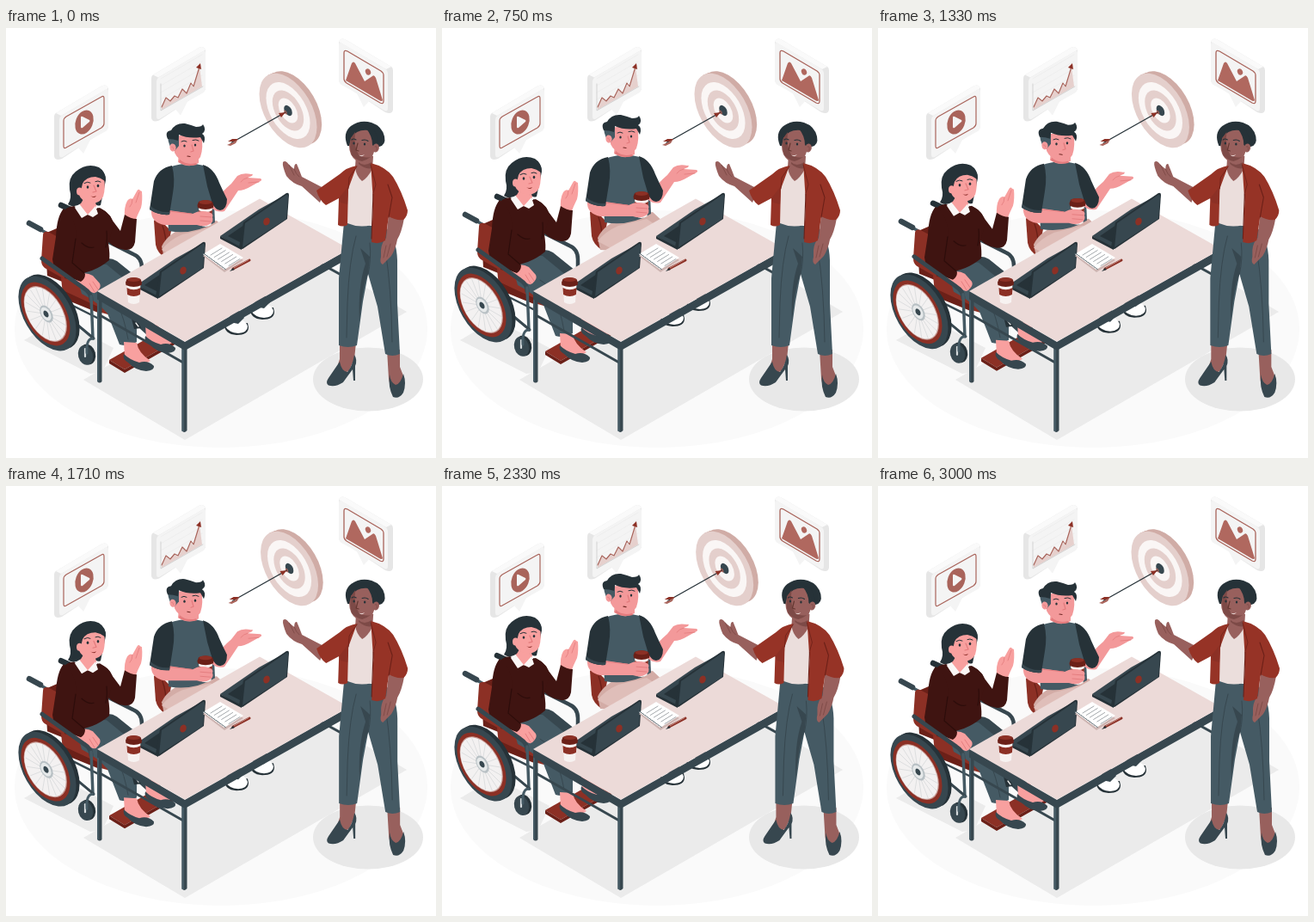
These frames come from a looping animation (500 by 500 pixels, 3040 ms). An HTML page with a canvas:

```html
<!DOCTYPE html>
<html lang="en">
<head>
<meta charset="utf-8">
<title>Team meeting</title>
<style>
html, body { margin: 0; width: 100%; height: 100%; overflow: hidden; background: #fff; }
canvas { display: block; width: 500px; height: 500px; }
</style>
</head>
<body>
<canvas id="stage" width="500" height="500"></canvas>
<script>
const ctx = document.getElementById('stage').getContext('2d');
const LOOP = 3040, STEP = 125 / 3;

const RED = '#8c3025', DEEP = '#6b2018', ROSE = '#a9645b', PALE = '#ecdad8', PINK = '#e4cfcc';
const JACKET = '#963326', MAROON = '#3f1411', WINE = '#2d0d0b';
const INK = '#263238', SLATE = '#37474f', STEEL = '#455a64';
const SKIN = '#f3999a', ROSY = '#f8a09f', BLUSH = '#e37b7d', BROWN = '#98605d', UMBER = '#7d4a47';
const WHITE = '#fff';

ctx.lineCap = ctx.lineJoin = 'round';

function fill(color, d) {
  ctx.fillStyle = color;
  ctx.fill(new Path2D(d));
}
function line(color, width, d) {
  ctx.strokeStyle = color;
  ctx.lineWidth = width;
  ctx.stroke(new Path2D(d));
}
function oval(color, x, y, rx, ry = rx, turn = 0) {
  ctx.fillStyle = color;
  ctx.beginPath();
  ctx.ellipse(x, y, rx, ry, turn, 0, 7);
  ctx.fill();
}
function at(x, y, draw) {
  ctx.save();
  ctx.translate(x, y);
  draw();
  ctx.restore();
}
// circle lying on the wall that faces lower left
function disc(color, x, y, r) {
  ctx.save();
  ctx.transform(.866, .5, 0, 1, x, y);
  oval(color, 0, 0, r);
  ctx.restore();
}

// ---- motion ----
const SHAKE = [0, -1, 2, -4, 4, -4, 4, -4, 2, -1, 0];
function shake(t, period) {
  const k = t % period / period * 10, i = Math.floor(k);
  return SHAKE[i] + (SHAKE[(i + 1) % 11] - SHAKE[i]) * (k - i);
}
const float = t => -10 * (1 - Math.abs(1 - t % 1500 / 750));

// ---- scenery ----
function floor() {
  oval('#fafafa', 250, 350, 240, 138);
  fill('#ebebeb', 'M90 409L208 479L466 330L348 260Z');
  fill('#ebebeb', 'M21 363L62 339L125 372L112 400L98 402Z');
  oval('#e8e8e8', 421, 408.5, 64, 37);
}

function bubble() {
  fill('#e6e6e6', 'M58 99L112 67Q117 65 119 70L119 116L65 152Q57 155 56 149L56 104Q56 100 58 99Z');
  fill('#fafafa', 'M58 99L112 67Q117 65 119 70L64 102Z');
  fill('#f4f4f4', 'M62 107Q62 103 66 101L115 72Q119 69 119 74L119 114Q119 118 116 120L98 130L90 146L84 139L66 150Q62 152 62 147Z');
}
function panels() {
  bubble();
  line(ROSE, 1.2, 'M67 108Q67 105 70 103L111 80Q114 78 114 82L114 111Q114 114 111 116L70 139Q67 141 67 137Z');
  oval(ROSE, 91, 109.5, 10, 14.5, .38);
  fill('#f4f4f4', 'M87 104Q87 102 89 103L97 107Q98 108 97 109L89 116Q87 117 87 115Z');

  at(113, -44.5, bubble);
  for (let i = 0; i < 5; i++) line('#e9e9e9', .6, `M180 ${91 - i * 8}L228 ${63 - i * 8}`);
  fill('#e6d0cd', 'M181 93L186 82L191 86L196 80L200 82L205 72L210 77L215 66L218 70L225 45L228 68L181 95Z');
  line(ROSE, 1.2, 'M181 92L186 81L191 85L196 79L200 81L205 71L210 76L215 64L218 68L225 45');
  fill(RED, 'M226 41L221 46L227 48Z');
  line('#c4c4c4', .7, 'M180 65L180 96L229 68');

  ctx.save();
  ctx.transform(-1, 0, 0, 1, 506, -54);
  bubble();
  ctx.restore();
  line(ROSE, 1.3, 'M393 29Q393 25 397 27L436 50Q439 52 439 55L439 85Q439 89 435 87L396 64Q393 62 393 59Z');
  fill('#b0685f', 'M395 61L402 41Q404 38 406 41L417 62L426 56Q428 54 430 58L438 84Q437 86 434 84Z');
  oval('#b0685f', 421, 51, 3, 3.8, -.4);
}

function target() {
  disc('#d0aca6', 334, 93, 38.3);
  fill('#d0aca6', 'M304 55L311 52L357 133L351 136Z');
  [[38.7, PINK], [29.5, '#faf6f5'], [21, PINK], [13, '#faf6f5'], [5.5, SLATE]]
    .forEach(([r, c]) => disc(c, 328, 96, r));
  disc(ROSE, 325, 98, 2);
  line(INK, 1.3, 'M262 133.5L325 98');
  fill(RED, 'M325 98L317 99L320 104Z');
  fill(RED, 'M258 132L263 129L270 129L266 132Z');
  fill(ROSE, 'M257 136L266 132L270 129L267 134L261 137Z');
}

// ---- man behind the table ----
function manShoe(x, y) {
  fill(INK, `M${x - 14} ${y - 4}Q${x - 14} ${y + 7} ${x} ${y + 8}Q${x + 14} ${y + 8} ${x + 14} ${y - 1}L${x + 13} ${y - 6}Z`);
  fill(WHITE, `M${x - 13} ${y - 8}L${x - 13} ${y - 2}Q${x - 9} ${y + 5} ${x + 2} ${y + 6}Q${x + 13} ${y + 5} ${x + 13} ${y - 2}Q${x + 12} ${y - 8} ${x} ${y - 13}Z`);
  fill(SLATE, `M${x - 12} ${y - 8}L${x + 2} ${y - 5}L${x + 9} ${y - 12}L${x} ${y - 24}Z`);
}
function coffee(x, y) {
  fill('#f7f2f1', `M${x - 8} ${y + 6}L${x + 8} ${y + 6}L${x + 6.5} ${y + 27}Q${x} ${y + 31} ${x - 6.5} ${y + 27}Z`);
  fill(RED, `M${x - 8} ${y + 10}Q${x} ${y + 14.5} ${x + 8} ${y + 10}L${x + 7.4} ${y + 18}Q${x} ${y + 22} ${x - 7.4} ${y + 18}Z`);
  fill(DEEP, `M${x - 9.5} ${y + 4}L${x - 8} ${y}Q${x} ${y - 3.5} ${x + 8} ${y}L${x + 9.5} ${y + 4}L${x + 9} ${y + 7}Q${x} ${y + 11} ${x - 9} ${y + 7}Z`);
  oval(RED, x, y + .6, 7.5, 2.5);
}
function man() {
  manShoe(268, 349);
  manShoe(298, 331);
  fill(RED, 'M172 224Q174 221 182 226L192 236L186 268Q176 262 174 252Z');
  line(DEEP, 1.4, 'M182 230Q186 240 187 262');
  fill('#d3aca6', 'M181 254Q188 238 214 229L245 224L262 240L215 270L184 268Z');
  fill('#dfbeb9', 'M181 258Q189 247 205 240L238 232L250 240L200 268Z');
  // torso and neck
  fill(STEEL, 'M190 162Q210 154 230 160Q238 166 241 180L243 226Q218 241 189 236L187 200Z');
  fill(SKIN, 'M201 146L224 148L224 157Q213 164 200 156Z');
  fill(BLUSH, 'M202 153Q210 160 221 157L222 159Q210 162 201 156Z');
  // far arm
  fill(SKIN, 'M240 206Q251 190 262 181L269 172Q275 168 285 170Q288 169 286 172L281 174L296 175Q299 177 294 179L285 184Q277 189 270 189L254 213Q246 215 240 210Z');
  line(BLUSH, .8, 'M281 174Q276 175 273 179M294 179L282 180');
  fill(INK, 'M229 159Q242 163 248 180Q253 191 257 199Q257 211 249 212Q243 211 240 204L234 184Z');
  // near arm with the cup
  coffee(232, 202);
  fill(SKIN, 'M169 207L190 212L217 216Q225 211 236 214Q242 216 240 220Q242 225 237 228Q231 232 222 229L184 229Q170 226 169 215Z');
  line(BLUSH, .9, 'M226 219L239 220M226 224L238 225M189 213L216 216');
  fill(INK, 'M193 160Q177 163 172 178L167 211Q177 218 190 217L194 192Q197 175 193 160Z');
  fill(SLATE, 'M167 211Q177 218 190 217L190.500 214Q177 215 168 207Z');
  // head
  fill(SKIN, 'M196 126L227 122Q230 139 226 150Q221 158 211 156Q200 154 196 145Z');
  fill(STEEL, 'M188 126L201 124L201 137L196 143Q189 139 188 126Z');
  oval(SKIN, 194, 139, 3.6, 4.6, -.2);
  line(BLUSH, .8, 'M192.500 138Q194 137 195 141');
  fill(INK, 'M188 129Q184 120 192 119Q197 110 208 111Q216 113 221 115Q228 115 229 112Q234 119 228 123Q233 126 230 134L226 127Q212 129 201 124L200 131Q195 129 188 129Z');
  oval(INK, 207.5, 137, 1.2, 1.6);
  oval(INK, 220, 136, 1.2, 1.6);
  line(INK, 1, 'M204 132Q207 130 210 132M217 130.500Q221 129 224 131');
  line(BLUSH, 1.2, 'M216 136L218 143L215 144');
  line('#702824', 1.2, 'M211 149L214 149.500');
}

// ---- woman in the wheelchair ----
function wheel() {
  disc(INK, 52, 330, 38.8);
  disc(SLATE, 48, 332, 38.8);
  disc(RED, 46, 332.5, 33);
  disc('#c59a94', 45.8, 332.5, 29);
  disc('#f3f1f1', 45.5, 332.5, 28);
  ctx.save();
  ctx.transform(.866, .5, 0, 1, 46.5, 332.5);
  for (let i = 0; i < 18; i++) {
    const a = i * Math.PI / 9;
    line('#c9cccd', .5, `M0 0L${27 * Math.cos(a)} ${27 * Math.sin(a)}`);
  }
  ctx.restore();
  disc('#b8c0c4', 47, 332.5, 9);
  disc('#e6e9ea', 46.5, 332.5, 7);
  disc(SLATE, 46.5, 332.5, 3.5);
}
function chairBack() {
  line(STEEL, 4, 'M64 206L82 216');
  line(INK, 6.5, 'M64 206L75 211');
  line(STEEL, 3.5, 'M27 227L50 240');
  line(SLATE, 6.5, 'M27 227L40 234');
  fill(DEEP, 'M45 239L66 230L78 300L48 288Z');
  fill(RED, 'M43 241Q43 236 49 237L66 246L68 292L45 279Q41 276 41 270Z');
  line(SLATE, 4.5, 'M118 248L148 263Q158 267 158 279L158 292');
}
function foot(x, y) {
  fill(ROSY, `M${x - 13} ${y - 23}L${x + 2} ${y - 22}Q${x + 4} ${y - 10} ${x + 18} ${y - 1}L${x + 8} ${y + 5}L${x - 12} ${y - 5}Z`);
  fill(SLATE, `M${x - 13} ${y - 9}Q${x - 6} ${y - 2} ${x + 5} ${y + 1}Q${x + 15} ${y - 2} ${x + 22} ${y + 5}Q${x + 23} ${y + 10} ${x + 13} ${y + 11}Q${x} ${y + 10} ${x - 8} ${y + 1}Q${x - 15} ${y - 3} ${x - 13} ${y - 9}Z`);
}
function seated() {
  chairBack();
  fill(RED, 'M64 290L112 302L150 318L122 334L104 329L66 310Z');
  fill(DEEP, 'M66 305L107 324L107 331L70 316Z');
  // foot rest
  fill(RED, 'M120 386L180 352L198 363L138 397Z');
  fill(DEEP, 'M120 386L138 397L138 401L120 390ZM138 397L198 363L198 367L138 401Z');
  // legs
  fill(SLATE, 'M98 279Q115 262 129 271L165 300L168 340L180 351L165 358L143 338Z');
  foot(175, 367);
  fill(STEEL, 'M82 288Q98 273 117 275L150 302L152 337L152 365Q142 371 132 368L118 332Q106 318 88 309Z');
  line(SLATE, 1, 'M114 303Q133 313 142 362');
  fill(INK, 'M146 338L153 340L157 349L149 350Z');
  line('#eee', 1.3, 'M151 343L154 347');
  foot(150, 388);
  // far arm and hand
  fill(ROSY, 'M138 221Q137 208 141 201Q144 197 147 199L152 190Q154 186 156 189L158 190Q159 201 157 209Q153 217 150 225Z');
  line(BLUSH, .8, 'M147 199Q147 205 144 208M155 191L151 203');
  fill(MAROON, 'M106 209Q119 212 124 224L133 236L138 217Q145 222 152 222L150 249Q148 259 138 258Q123 256 113 242Z');
  // body
  fill(MAROON, 'M79 207Q93 215 109 209Q123 216 125 229L119 250Q121 263 120 270Q102 285 80 286L62 276Q58 237 66 214Q70 208 79 207Z');
  line(WINE, 1.2, 'M117 236Q118 247 116 255M88 250Q96 257 102 255');
  fill(ROSY, 'M86 198L106 200L104 212Q95 224 84 209Z');
  fill('#faf7f6', 'M84 203L95 217L88 221L80 209ZM95 217L104 207L107 216L101 220Z');
  // near arm
  fill(ROSY, 'M82 287Q93 283 101 288L109 297Q111 301 107 305Q104 310 99 307L90 300L81 295Z');
  line(BLUSH, .9, 'M101 295L107 304M97 297L103 307');
  fill(MAROON, 'M67 210Q59 219 58 243L54 269Q55 281 65 287L87 295Q92 292 92 286L77 273L82 240Q79 217 67 210Z');
  line(WINE, 1.2, 'M77 273L81 245M77 273L91 285');
  // head
  fill(INK, 'M81 167Q94 156 108 162Q116 167 116 177L110 206Q104 208 104 202L98 186L87 204Q79 210 72 205Q77 198 74 188Q72 174 81 167Z');
  fill(ROSY, 'M87 177Q98 168 114 175Q116 186 113 196Q109 204 99 204Q88 203 84 192Z');
  fill(INK, 'M83 192L78 182Q80 167 93 163Q107 159 114 169Q117 174 115 178Q110 174 104 173Q93 173 89 181Q88 187 86 190Z');
  oval(ROSY, 85.5, 190, 3.5, 4.5);
  oval(INK, 95, 185, 1.3, 1.7);
  oval(INK, 107, 183.5, 1.3, 1.7);
  line(INK, 1, 'M91 180.500Q95 178 98 180M104 178.500Q107 177 110 179');
  line(BLUSH, 1.2, 'M102 183L105 190L101 191');
  fill('#8d2e2a', 'M98 195Q101 197 105 195Q103 199 98 195Z');
  // chair frame
  line(SLATE, 2.5, 'M70 319L110 339');
  line(SLATE, 5, 'M42 268L91 303Q99 308 99 316');
  line(STEEL, 3.5, 'M99 312L101 361');
  line(SLATE, 3, 'M78 341L102 361');
  wheel();
  oval(INK, 95, 379.5, 9, 12, -.25);
  oval(SLATE, 92.5, 380.5, 8.5, 11.5, -.25);
  line('#d5dadc', 2.2, 'M92 373L92 382');
  line(STEEL, 3, 'M101 361Q93 361 94 378');
}

// ---- table and things on it ----
function laptop() {
  fill(SLATE, 'M152 299L197 268L226 252L215 288L177 314Z');
  fill(INK, 'M161 299L196 275L206 287L177 307Z');
  fill(INK, 'M152 299L177 312L177 315L152 302Z');
  fill(INK, 'M179 283L229 249Q232 248 232 251L230 279L178 314L174 312Z');
  fill(SLATE, 'M181 284L229 251Q231 250 231 253L229 279L178 312Z');
  oval(RED, 206, 282, 3.6, 4.6, .4);
}
function table() {
  line(SLATE, 3, 'M111 335L206 389M366 274L395 290');
  fill(SLATE, 'M106 310h5.5V411Q109 414 106 411Z');
  fill(STEEL, 'M106 312h2V411h-2Z');
  fill(SLATE, 'M204.5 366h6V468Q207 472 204.5 468Z');
  fill(STEEL, 'M204.5 368h2.5V469h-2.5Z');
  fill(SLATE, 'M394 262h5V366h-5Z');
  fill(SLATE, 'M106 306L208 365L399 257V267.5L208 375L106 315.500Z');
  fill(PALE, 'M106 306L295 198.5L399 257L208 364.5Z');

  at(97, -57, laptop);
  laptop();
  // notebook
  fill('#cdb5b2', 'M229 265L249 254L276 270L254 284Z');
  fill(WHITE, 'M229 263L249 251L276 267L254 281Z');
  for (let i = 0; i < 6; i++) {
    const x = 238 + i * 4.2, y = 264 + i * 2.5;
    line('#8f9498', .8, `M${x} ${y}L${x + 13} ${y - 8}`);
  }
  for (let i = 0; i < 9; i++) line(SLATE, .9, `M${230 + i * 2.9} ${262 + i * 2.1}l2 2`);
  line(RED, 3, 'M264 280L283 270');
  line('#c38b83', 1, 'M265 279L282 269.5');
  fill(INK, 'M260 283L264 279L266 281Z');
  coffee(148.5, 292);
}

// ---- presenter ----
function presenter() {
  // ankles and shoes
  fill(BROWN, 'M388 365L407 366L405 385L399 398L383 409Q385 393 388 385Z');
  fill(SLATE, 'M388 388Q390 399 397 400Q403 393 405 380Q409 386 406 393L406 410L404 410L403 397Q397 405 392 412Q383 418 375 415.500Q371 413 375 407Z');
  fill(BROWN, 'M443 374L458 374L458 394L463 407L459 423L448 422L445 408Z');
  fill(SLATE, 'M446 403Q447 412 453 415Q459 414 462 402Q466 413 462 424Q457 432 450 429Q444 417 446 403Z');
  // trousers
  fill(STEEL, 'M393 226L441 232Q454 243 455 270L455 320L458 379Q449 383 441 379L432 324L421 286L415 318L408 369Q398 373 387 369L387 291Z');
  line(SLATE, 1, 'M423 250Q425 269 421 286M407 242Q399 270 397 320L396 360M441 258Q448 300 449 365');
  fill(SLATE, 'M412 256Q420 263 423 266L421 286Q414 302 411 342Q409 300 418 274Z');
  // left arm
  fill(BROWN, 'M365 203L344 184Q333 181 326 172Q321 160 322 156Q325 153 329 159L335 164Q335 157 338 158Q341 165 344 173L371 187Z');
  line(UMBER, .9, 'M329 159L335 171M335 164Q337 170 341 173');
  // shirt and jacket
  fill('#ebdedc', 'M398 164L424 160L427 193L425 229Q411 233 397 227Z');
  fill(BROWN, 'M407 147L427 149L426 164Q420 175 414 178Q407 172 406 162Z');
  fill(UMBER, 'M410 156Q416 162 425 156L426 163Q418 165 410 158Z');
  fill(JACKET, 'M408 160Q396 162 388 170L361 189Q364 200 372 206L387 198L386 229Q391 232 397 229L398 187Z');
  fill(RED, 'M387 198L398 184L397 205L389 203Z');
  // right hand
  fill(BROWN, 'M445 217L463 221Q460 238 455 246Q453 257 448 265L438 275Q434 273 436 266L436 258Q437 249 442 244Z');
  line(UMBER, .9, 'M447 251L443 266M442 253L439 267');
  fill(JACKET, 'M424 157Q441 161 450 173Q460 189 467 212Q467 219 462 223Q453 224 445 219L441 247Q434 252 425 249L427 202Z');
  line(DEEP, 1.1, 'M445 220L449 197L444 182M427 193L425 245');
  line(DEEP, .8, 'M424 159L430 182L427 192M408 161L399 174L398 187');
  // head
  fill(INK, 'M397 137Q391 122 401 114Q412 106 425 110Q437 114 440 126Q442 136 434 138L426 140Z');
  fill(BROWN, 'M401 128Q408 117 422 119L429 134Q429 146 424 152Q416 158 407 154Q399 148 399 137Z');
  fill(UMBER, 'M401 128Q399 139 402 148Q408 154 414 155Q420 153 424 150Q416 152 410 147Q404 138 406 121Z');
  fill(INK, 'M418 116L428 118L433 130L431 141L426 136Q426 125 418 116Z');
  oval(BROWN, 430, 139.5, 3.8, 5, .2);
  line(UMBER, .8, 'M429 138Q432 136 431 142');
  oval(INK, 404.5, 134, 1.2, 1.6);
  oval(INK, 417, 135, 1.2, 1.6);
  line(INK, 1.1, 'M402 130Q404 128 407 130M414 130.500Q418 129 421 131.500');
  line('#633731', 1.2, 'M409 134L407 142L410 143');
  fill('#f3e4e1', 'M410 147.500Q414 149 417 147Q414 151 410 147.500Z');
}

function frame(now) {
  // 24 pictures a second
  const t = Math.floor((now % LOOP + 5) / STEP) * STEP % 3000;
  const lift = float(t);
  ctx.fillStyle = WHITE;
  ctx.fillRect(0, 0, 500, 500);
  floor();
  panels();
  at(shake(t, 3000), 0, target);
  at(0, lift, man);
  at(0, lift, seated);
  table();
  at(shake(t, 1500), 0, presenter);
}

let start;
function tick(now) {
  start ??= now;
  frame(now - start);
  requestAnimationFrame(tick);
}
frame(0);
requestAnimationFrame(tick);
</script>
</body>
</html>
```
